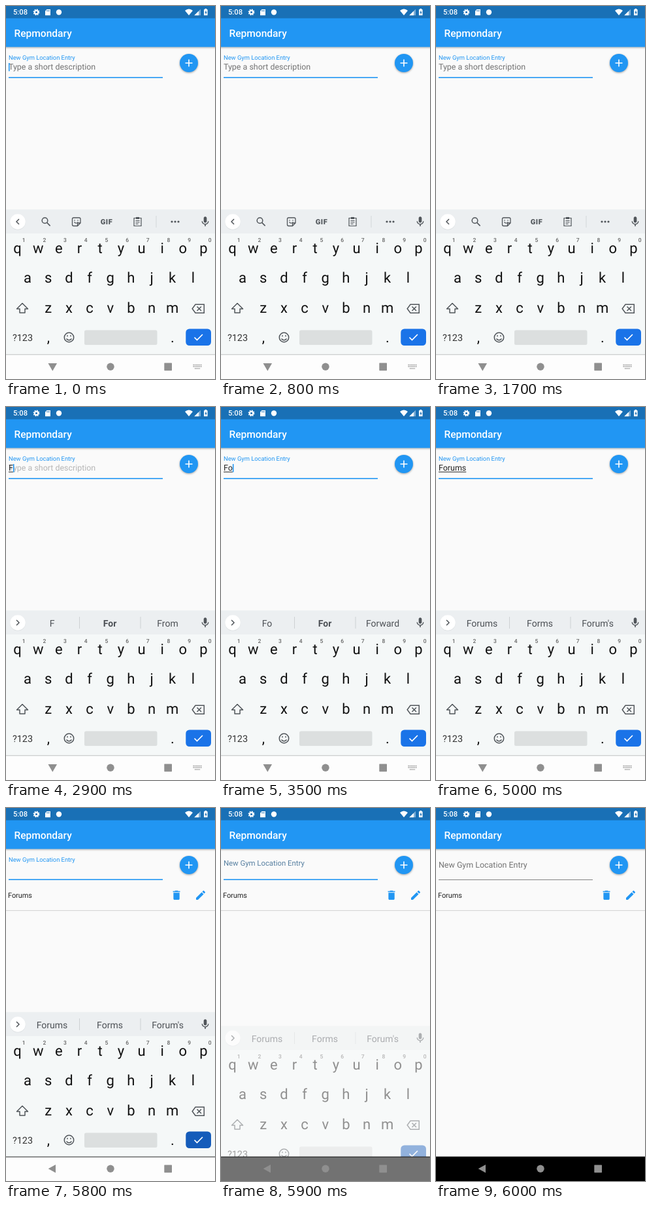
Recreate the animation shown at these times as an HTML page. Size 320 by 569 pixels, loop 8 s.

```html
<!DOCTYPE html>
<html lang="en">
<head>
<meta charset="utf-8">
<title>Gym location entry</title>
<style>
  html, body { margin: 0; width: 100%; height: 100%; overflow: hidden; background: #fafafa; }
  svg { display: block; width: 100vw; height: 100vh; font-family: Roboto, sans-serif; text-rendering: geometricPrecision; }
  .mid { text-anchor: middle; }
  .field { font-size: 12.45px; }
  .line { fill: none; stroke: #50555a; stroke-width: 1.5; }
  .fab { filter: drop-shadow(0 1.5px 1.5px rgba(0, 0, 0, .35)); }
</style>
</head>
<body>
<svg viewBox="0 0 320 569" preserveAspectRatio="none">
  <defs>
    <linearGradient id="shade" x2="0" y2="1">
      <stop stop-color="#000" stop-opacity=".25"/>
      <stop offset="1" stop-color="#000" stop-opacity="0"/>
    </linearGradient>
  </defs>
  <rect width="320" height="569" fill="#fafafa"/>

  <!-- status and app bars -->
  <rect y="62" width="320" height="4" fill="url(#shade)"/>
  <rect width="320" height="62.5" fill="#2196f3"/>
  <rect width="320" height="18.7" fill="#1970b6"/>
  <g fill="#fff">
    <text x="11" y="13.3" font-size="11.2" font-weight="500">5:08</text>
    <text x="12.5" y="46.5" font-size="15.56" font-weight="500">Repmondary</text>
    <circle cx="46.5" cy="9.5" r="2.7" fill="none" stroke="#fff" stroke-width="2.2"/>
    <circle cx="46.5" cy="9.5" r="4.2" fill="none" stroke="#fff" stroke-width="1.5" stroke-dasharray="1.7 1.6"/>
    <path d="M62.5 5h5.5v9.3h-8V7.7z"/>
    <path d="M62.7 6.3v2M64.5 6.3v2M66.3 6.3v2" stroke="#1970b6" stroke-width=".9"/>
    <circle cx="81" cy="9.5" r="4.2"/>
    <path d="M274 7q6-5 12 0l-6 7.3z"/>
    <path d="M298 4.7v9.5h-9.7z" opacity=".45"/>
    <path d="M295 7.7v6.5h-6.7z"/>
    <path d="M303 5.3h1.5V4h2.6v1.3h1.5v9H303z"/>
    <path d="M306.4 6.4l-2.2 4h1.5v2.8l2-4h-1.3z" fill="#1970b6"/>
  </g>

  <!-- form -->
  <text id="label" x="0" y="0" class="field">New Gym Location Entry</text>
  <text id="hint" x="4" y="97.4" class="field" fill="#737373">Type a short description</text>
  <text id="typed" x="4" y="97.4" class="field" fill="#212121"></text>
  <rect id="under" x="4" y="98.6" height="1" fill="#212121"/>
  <rect id="cursor" y="87" width="1.6" height="12.4" fill="#2196f3"/>
  <rect id="rule" x="4" width="236"/>
  <g class="fab"><circle cx="280" cy="87" r="14" fill="#2196f3"/></g>
  <path d="M274.5 87h11M280 81.5v11" stroke="#fff" stroke-width="1.6"/>
  <g id="item">
    <text x="3" y="137" font-size="10.9" fill="#212121">Forums</text>
    <path d="M0 156.4h320" stroke="#d2d2d2"/>
    <g fill="#2196f3">
      <path transform="translate(251.7 123.7) scale(.778)" d="M6 19c0 1.1.9 2 2 2h8c1.1 0 2-.9 2-2V7H6v12zM19 4h-3.5l-1-1h-5l-1 1H5v2h14V4z"/>
      <path transform="translate(288.7 123.7) scale(.778)" d="M3 17.25V21h3.75L17.81 9.94l-3.75-3.75L3 17.25zM20.71 7.04c.39-.39.39-1.02 0-1.41l-2.34-2.34c-.39-.39-1.02-.39-1.41 0l-1.83 1.83 3.75 3.75 1.83-1.83z"/>
    </g>
  </g>

  <!-- keyboard -->
  <g id="board">
    <rect y="310.5" width="320" height="222" fill="#f5f8f8"/>
    <rect y="310.5" width="320" height="36.5" fill="#eceff1"/>
    <circle cx="18" cy="329.5" r="12" fill="#cfd3d6" opacity=".6"/>
    <circle cx="18" cy="329" r="11.8" fill="#fff"/>
    <path id="chevron" class="line"/>
    <path transform="translate(295.7 319.7) scale(.778)" fill="#50555a" d="M12 14c1.66 0 3-1.34 3-3V5c0-1.66-1.34-3-3-3S9 3.34 9 5v6c0 1.66 1.34 3 3 3zm5.3-3c0 3-2.54 5.1-5.3 5.1S6.7 14 6.7 11H5c0 3.41 2.72 6.23 6 6.72V21h2v-3.28c3.28-.48 6-3.3 6-6.72h-1.7z"/>
    <g id="tools">
      <g class="line">
        <circle cx="59.5" cy="327.3" r="4.3"/>
        <path d="M62.6 330.4l5 5"/>
        <path d="M103.5 323h8.5q2 0 2 2v6l-4.500 4.500h-6q-2 0-2-2v-8.500q0-2 2-2zM114 331h-2.500q-2 0-2 2v2.500" stroke-width="1.3"/>
        <path d="M104.500 329.500q3 3.500 6 0M105 326.300v1.500M110 326.300v1.500" stroke-width="1.2"/>
        <path d="M196 323.500h11v12h-11zM198.500 327.500h6M198.500 330h6M198.500 332.500h4" stroke-width="1.2"/>
        <path d="M199 323.500h5" stroke-width="3"/>
      </g>
      <text x="154" y="333" class="mid" font-size="11" font-weight="900" letter-spacing=".5" fill="#50555a">GIF</text>
      <path d="M230 320v18" stroke="#d3d7d9"/>
      <g fill="#50555a"><circle cx="254" cy="329" r="1.6"/><circle cx="259" cy="329" r="1.6"/><circle cx="264" cy="329" r="1.6"/></g>
    </g>
    <g id="words" class="mid" font-size="14" fill="#4c5055">
      <path d="M112.500 320v18M206 320v18" stroke="#cdd1d3"/>
      <text x="70.500" y="334.700"></text><text x="159" y="334.700"></text><text x="247.500" y="334.700"></text>
    </g>
    <g id="keys" class="mid" font-size="22" fill="#111"></g>
    <g class="line">
      <path d="M25 453.500l8.500 8.500h-4.500v6h-8v-6h-4.500z" stroke-linejoin="round"/>
      <path d="M290 455.300h13.300v13H290l-4.800-6.500zM292.500 458.500l6.500 6.500M299 458.500l-6.500 6.500"/>
      <circle cx="96.500" cy="505.500" r="7.200"/>
      <path d="M92.500 507.500q4 4.500 8 0M94 502.300v2M99 502.300v2"/>
    </g>
    <text x="25.500" y="510.700" class="mid" font-size="14.400" fill="#333">?123</text>
    <rect x="120" y="494.500" width="111.500" height="22.500" rx="2.500" fill="#dcdfdf"/>
    <rect id="enter" x="275.300" y="492.500" width="38.700" height="25.500" rx="5.500"/>
    <path d="M288.500 505.500l4 4 8.500-8.500" fill="none" stroke="#fff" stroke-width="1.700"/>
  </g>

  <!-- navigation bar -->
  <rect y="531.700" width="320" height="38" fill="#000"/>
  <g id="light"><rect y="531.700" width="320" height="38" fill="#fdfdfd"/><path d="M0 532.200h320" stroke="#e4e6e6"/></g>
  <g fill="#8f8f8f">
    <path id="back"/>
    <circle cx="160" cy="550.300" r="5.700"/>
    <rect x="242.300" y="544.500" width="11.700" height="11.700" rx=".6"/>
    <path id="switcher" d="M286.500 547.500h13M286.500 550h13M289 553h8" stroke="#8f8f8f" stroke-width="1.400" stroke-dasharray="1.400 .9"/>
  </g>
</svg>
<script>
const $ = id => document.getElementById(id);
const set = (id, attrs) => { for (const k in attrs) $(id).setAttribute(k, attrs[k]); };
const show = (id, on) => set(id, { visibility: on ? 'visible' : 'hidden' });
const mix = (a, b, p) => a + (b - a) * p;

function addText(str, x, y, attrs = '') {
  $('keys').insertAdjacentHTML('beforeend', `<text x="${x}" y="${y}" ${attrs}>${str}</text>`);
}
[['qwertyuiop', 17.5, 376.5], ['asdfghjkl', 33, 422], ['zxcvbnm', 64.7, 467.5]].forEach(([row, x, y]) =>
  [...row].forEach((c, i) => addText(c, x + 31.67 * i, y)));
[...'1234567890'].forEach((c, i) => addText(c, 27.2 + 31.67 * i, 360.3, 'font-size="8.5" font-weight="500" fill="#666"'));
addText(',', 65, 513);
addText('.', 255, 513);

const typing = [[0, ''], [2800, 'F'], [3500, 'Fo'], [3600, 'For'], [3800, 'Foru'], [4000, 'Forum'], [4500, 'Forums'], [5800, '']];
const guesses = [
  [0, ''], [2900, 'F For From'], [3200, 'F For Friends'], [3500, 'Fo For Forward'],
  [3600, 'For Forms Forums'], [4000, 'Forum Forums Form'], [4500, "Forums Forms Forum's"]
];
const blinks = [[0, 500], [1000, 1500], [2100, 2600], [2800, 5000], [5500, 5800]];
const at = (list, t) => list.filter(e => e[0] <= t).pop()[1];

function draw(t) {
  const text = at(typing, t), guess = at(guesses, t);
  const sent = t >= 5800, closed = t >= 6000;

  $('typed').textContent = text;
  const width = text ? $('typed').getComputedTextLength() : 0;
  set('under', { width });
  set('cursor', { x: 4 + width });
  show('cursor', blinks.some(([a, b]) => t >= a && t < b));
  set('hint', { opacity: Math.min(1, Math.max(0, (3000 - t) / 200)) });

  // the label drops back into the empty field while the keyboard leaves
  const drop = closed ? 1 : t >= 5900 ? .65 : 0;
  const ink = [[33, 115], [150, 115], [243, 115]].map(([a, b]) => Math.round(mix(a, b, drop)));
  set('label', {
    transform: `translate(4 ${mix(82, 91.4, drop)}) scale(${mix(.75, 1, drop)})`,
    fill: `rgb(${ink})`
  });
  set('rule', closed ? { y: 109, height: .9, fill: '#777' } : { y: 108.4, height: 1.6, fill: '#2196f3' });
  show('item', sent);

  const opacity = closed ? 0 : t >= 5900 ? .45 : 1;
  set('board', { opacity, transform: `translate(0 ${t >= 5900 ? 22 : sent ? 1 : 0})` });
  set('light', { opacity, transform: `translate(0 ${sent ? 1 : 0})` });
  set('enter', { fill: t >= 5700 ? '#155cba' : '#1a73e8' });
  set('chevron', { d: guess ? 'M16 325l4 4-4 4' : 'M20 325l-4 4 4 4' });
  show('tools', !guess);
  show('words', guess);
  const words = guess.split(' ');
  $('words').querySelectorAll('text').forEach((el, i) => {
    el.textContent = words[i] || '';
    el.setAttribute('font-weight', i === 1 && t < 3600 ? 700 : 400);
  });

  set('back', { d: sent ? 'M64.700 550.300L76 544v12.600z' : 'M64.500 545h13.600l-6.800 11.800z' });
  show('switcher', !sent);
}

const start = performance.now();
function tick() {
  const t = (performance.now() - start) % 8000;
  draw(Math.floor(t / 100) * 100);
  requestAnimationFrame(tick);
}
tick();
</script>
</body>
</html>
```
